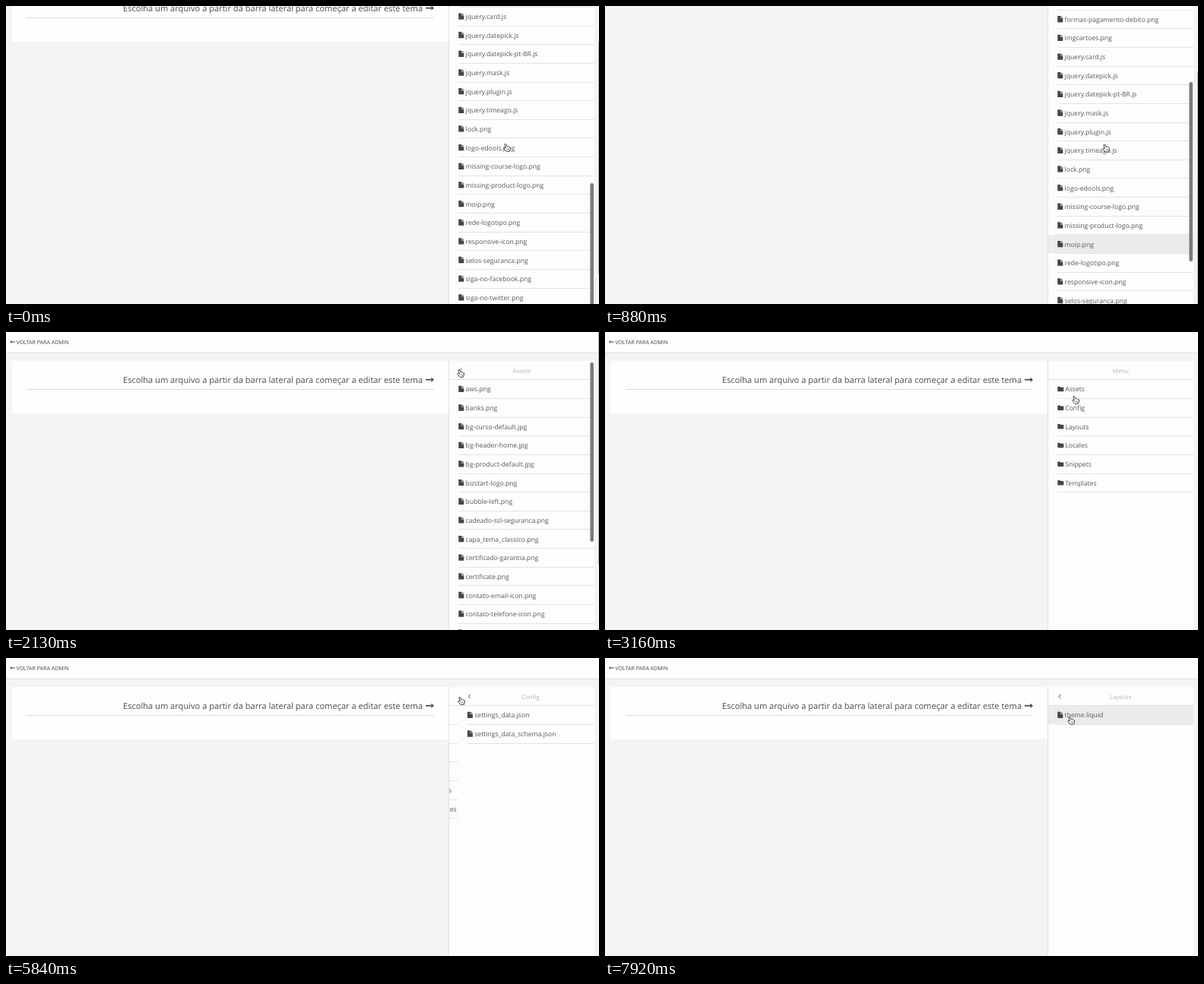
Recreate the animation shown at these times as an HTML page with a canvas. Size 780x392 px, loop 8 s.

```html
<!DOCTYPE html>
<html lang="pt-BR">
<head>
<meta charset="utf-8">
<title>Editor de tema</title>
<style>
html, body { margin: 0; width: 100%; height: 100%; overflow: hidden; background: #f4f4f4; }
canvas { display: block; width: 780px; height: 392px; }
</style>
</head>
<body>
<canvas id="stage"></canvas>
<script>
const W = 780, H = 392, LOOP = 8000;
const PANEL = { x: 583, y: 38, w: 191, h: 464 };
const ROW = 24.65, FIRST = 75;
const FONT = '"Open Sans", "Noto Sans", sans-serif';

const canvas = document.getElementById('stage');
const ctx = canvas.getContext('2d');
const dpr = window.devicePixelRatio || 1;
canvas.width = W * dpr;
canvas.height = H * dpr;

const png = names => names.split(' ').map(n => n + '.png');
const folders = ['Assets', 'Config', 'Layouts', 'Locales', 'Snippets', 'Templates'];
const files = {
  Assets: [
    ...png('aws banks'),
    'bg-curso-default.jpg', 'bg-header-home.jpg', 'bg-product-default.jpg',
    ...png('bizstart-logo bubble-left cadeado-ssl-seguranca capa_tema_classico certificado-garantia ' +
      'certificate contato-email-icon contato-telefone-icon default-avatar formas-pagamento-boleto ' +
      'formas-pagamento-credito formas-pagamento-debito imgcartoes'),
    ...['card', 'datepick', 'datepick-pt-BR', 'mask', 'plugin', 'timeago'].map(n => `jquery.${n}.js`),
    ...png('lock logo-edools missing-course-logo missing-product-logo moip rede-logotipo ' +
      'responsive-icon selos-seguranca siga-no-facebook siga-no-twitter sprite-icons'),
    'style.css', 'theme.css', 'theme.js'
  ],
  Config: ['settings_data.json', 'settings_data_schema.json'],
  Layouts: ['theme.liquid']
};

// Bursts of screen updates: first time, last time, count
const bursts = [
  [150, 450, 3], [730, 1180, 4], [1330, 1740, 3], [1930, 2130, 2], [2570, 3460, 7],
  [3900, 4650, 6], [4950, 5250, 3], [5840, 6730, 7], [7030, 7920, 7]
];
const ticks = [0];
for (const [a, b, n] of bursts)
  for (let i = 0; i < n; i++) ticks.push(Math.floor((a + (b - a) * i / (n - 1)) / 10) * 10);

// Tracks: [time, value, ...]
const pageTrack = [[0, 60], [150, 92], [300, 110], [1030, 110], [1180, 96], [1330, -4], [1530, -1], [1740, 0]];
const listTrack = [[0, 445], [150, 455], [300, 468], [450, 468], [730, 430], [880, 342], [1030, 190], [1180, 30], [1330, 0]];
const barTrack = [[0, 253], [300, 232], [450, 228], [880, 170], [1330, 0]];
const cursorTrack = [
  [0, 659, 186], [1330, 659, 187], [1530, 629, 90], [1740, 606, 64], [1930, 598, 54],
  [2720, 598, 54], [3160, 619, 89], [3460, 619, 102], [4050, 619, 102], [4350, 621, 116],
  [4650, 634, 160], [4950, 625, 118], [5250, 599, 56], [5990, 599, 56], [6430, 612, 102],
  [6730, 619, 130], [7180, 619, 130], [7620, 614, 88], [7920, 613, 82]
];
const slides = [[2560, 1, 0], [3830, 0, 1], [5780, 1, 0], [7000, 0, 1]];
const hovers = [
  [450, 1180, 'moip.png', '#ebebeb'], [1330, 1930, 'bg-product-default.jpg', '#f3f3f3'],
  [3460, 4050, 'Config', '#ebebeb'], [6730, 7330, 'Layouts', '#e9e9e9'],
  [7770, 8000, 'theme.liquid', '#ebebeb']
];

function at(track, t) {
  const i = track.findIndex(k => k[0] > t);
  if (i < 0) return track[track.length - 1].slice(1);
  const a = track[i - 1], b = track[i], p = (t - a[0]) / (b[0] - a[0]);
  return a.slice(1).map((v, j) => v + (b[j + 1] - v) * p);
}

function openness(t) {
  let s = 1;
  for (const [start, from, to] of slides) {
    if (t < start) break;
    const p = Math.min(1, (t - start) / 400);
    s = from + (to - from) * p * p * (3 - 2 * p);
  }
  return s;
}

function rect(x, y, w, h, color) {
  ctx.fillStyle = color;
  ctx.fillRect(x, y, w, h);
}

function text(str, x, mid, size, color, align = 'left') {
  ctx.font = `${size}px ${FONT}`;
  ctx.textAlign = align;
  ctx.fillStyle = color;
  ctx.fillText(str, x, mid + size * 0.388);
}

function poly(points, color) {
  ctx.fillStyle = color;
  ctx.beginPath();
  for (let i = 0; i < points.length; i += 2) ctx.lineTo(points[i], points[i + 1]);
  ctx.closePath();
  ctx.fill();
}

function pill(x, y, w, h, color) {
  ctx.fillStyle = color;
  ctx.beginPath();
  ctx.roundRect(x, y, w, h, w / 2);
  ctx.fill();
}

function longArrow(tail, tip, y, thick, head, color) {
  const dir = Math.sign(tip - tail), neck = tip - dir * head;
  rect(Math.min(tail, neck), y - thick / 2, Math.abs(neck - tail), thick, color);
  poly([neck, y - head * 0.85, tip, y, neck, y + head * 0.85], color);
}

function fileIcon(x, y) {
  poly([x, y - 4.3, x + 3.8, y - 4.3, x + 3.8, y - 1.1, x + 7, y - 1.1, x + 7, y + 4, x, y + 4], '#444');
  poly([x + 4.4, y - 4.3, x + 7, y - 1.7, x + 4.4, y - 1.7], '#444');
}

function folderIcon(x, y) {
  ctx.fillStyle = '#444';
  ctx.beginPath();
  ctx.roundRect(x, y - 3.2, 3.6, 3, 0.7);
  ctx.roundRect(x, y - 2.2, 8, 5.5, 0.8);
  ctx.fill();
}

function chevron(x, y) {
  ctx.strokeStyle = '#999';
  ctx.lineWidth = 1.2;
  ctx.beginPath();
  ctx.moveTo(x + 1.6, y - 2.9);
  ctx.lineTo(x - 1.3, y);
  ctx.lineTo(x + 1.6, y + 2.9);
  ctx.stroke();
}

function panel(title, names, icon, dx, dy, hover, back) {
  ctx.save();
  ctx.translate(dx, 0);
  rect(PANEL.x, 0, PANEL.w, H, '#fdfdfd');
  text(title, 678.3, 50.5 + dy, 7.85, '#b4b4b4', 'center');
  if (back) chevron(598, 50.5 + dy);
  rect(PANEL.x, 62 + dy, PANEL.w, 1, '#e3e3e3');
  names.forEach((name, i) => {
    const y = FIRST + ROW * i + dy;
    if (y < -ROW || y > H + ROW) return;
    if (hover && hover[2] === name) rect(PANEL.x, y - 12, PANEL.w, ROW - 0.6, hover[3]);
    rect(595, Math.round(y + 11.9), 179, 1, '#e3e3e3');
    icon(595.3, y);
    text(name, icon === folderIcon ? 605.2 : 604.6, y, 8.64, '#585858');
  });
  ctx.restore();
}

function hand(x, y) {
  ctx.save();
  ctx.translate(x, y);
  ctx.beginPath();
  ctx.moveTo(-1.6, 1.2);
  ctx.lineTo(-3.1, -3.8);
  ctx.quadraticCurveTo(-2.6, -5.6, -1.3, -4.2);
  ctx.lineTo(-0.2, -1.3);
  ctx.quadraticCurveTo(1, -2.2, 1.7, -1);
  ctx.quadraticCurveTo(3, -1.6, 3.3, -0.4);
  ctx.quadraticCurveTo(4.7, -0.6, 4.6, 1);
  ctx.lineTo(4.1, 3.4);
  ctx.lineTo(3.3, 5.3);
  ctx.lineTo(-1, 5.3);
  ctx.lineTo(-4.1, 1.6);
  ctx.quadraticCurveTo(-4.3, 0, -2.9, 0.2);
  ctx.closePath();
  ctx.fillStyle = '#fff';
  ctx.fill();
  ctx.strokeStyle = '#333';
  ctx.lineWidth = 0.9;
  ctx.lineJoin = 'round';
  ctx.stroke();
  ctx.beginPath();
  for (const k of [0, 1.4, 2.8]) {
    ctx.moveTo(k, 1.4);
    ctx.lineTo(k, 3.6);
  }
  ctx.lineWidth = 0.5;
  ctx.stroke();
  ctx.restore();
}

function pointer(x, y) {
  const shape = new Path2D('M-2.6-5V4L-.6 2.2 .9 5.4 2.4 4.7 1 1.6H3.7Z');
  ctx.save();
  ctx.translate(x + 0.6, y);
  ctx.strokeStyle = '#fff';
  ctx.lineWidth = 1.4;
  ctx.stroke(shape);
  ctx.fillStyle = '#111';
  ctx.fill(shape);
  ctx.restore();
}

function sidebar(t, page) {
  const open = openness(t);
  const hover = hovers.find(h => t >= h[0] && t < h[1]);
  const name = t < 3500 ? 'Assets' : t < 6500 ? 'Config' : 'Layouts';
  const scroll = name === 'Assets' ? at(listTrack, t)[0] : 0;
  ctx.save();
  ctx.beginPath();
  ctx.rect(PANEL.x, PANEL.y - page, PANEL.w, PANEL.h + 10);
  ctx.clip();
  if (open < 1) panel('Menu', folders, folderIcon, -0.3 * open * PANEL.w, -page, hover, false);
  if (open > 0) panel(name, files[name], fileIcon, (1 - open) * PANEL.w, -page - scroll, hover, true);
  ctx.restore();
  rect(582, PANEL.y - page, 1, PANEL.h + 10, '#e1e1e1');
}

function draw(t) {
  const page = at(pageTrack, t)[0];
  ctx.setTransform(dpr, 0, 0, dpr, 0, 0);
  ctx.textRendering = 'geometricPrecision';
  rect(0, 0, W, H, '#f4f4f4');

  rect(0, -page - 10, W, 37, '#fefefe');
  rect(0, 27 - page, W, 1, '#dedede');
  longArrow(12, 5, 13 - page, 1, 2.4, '#444');
  text('VOLTAR PARA ADMIN', 13.5, 13 - page, 7.05, '#444');

  rect(7.5, 38 - page, 574.5, 69, '#fefefe');
  text('Escolha um arquivo a partir da barra lateral para começar a editar este tema',
    154, 62.5 - page, 11.1, '#4c4c4c');
  longArrow(552, 563, 62.7 - page, 1.7, 3.6, '#444');
  rect(27, 75 - page, 536, 1, '#d9d9d9');

  sidebar(t, page);
  if (t < 2570) {
    pill(768.4, 40 - page + at(barTrack, t)[0], 4.6, 236, '#7b7b7b');
    rect(779, Math.max(0, page) * H / 502, 1, 306, '#b0b0b0');
  }

  const [x, y] = at(cursorTrack, t);
  (t >= 4350 && t < 5100 ? pointer : hand)(x, y);
}

function frame(now) {
  const t = now % LOOP;
  draw(ticks.filter(k => k <= t).pop());
  requestAnimationFrame(frame);
}
const begin = performance.now();
requestAnimationFrame(function loop() {
  frame.last = Math.max(0, performance.now() - begin);
  draw(ticks.filter(k => k <= frame.last % LOOP).pop());
  requestAnimationFrame(loop);
});
</script>
</body>
</html>
```
